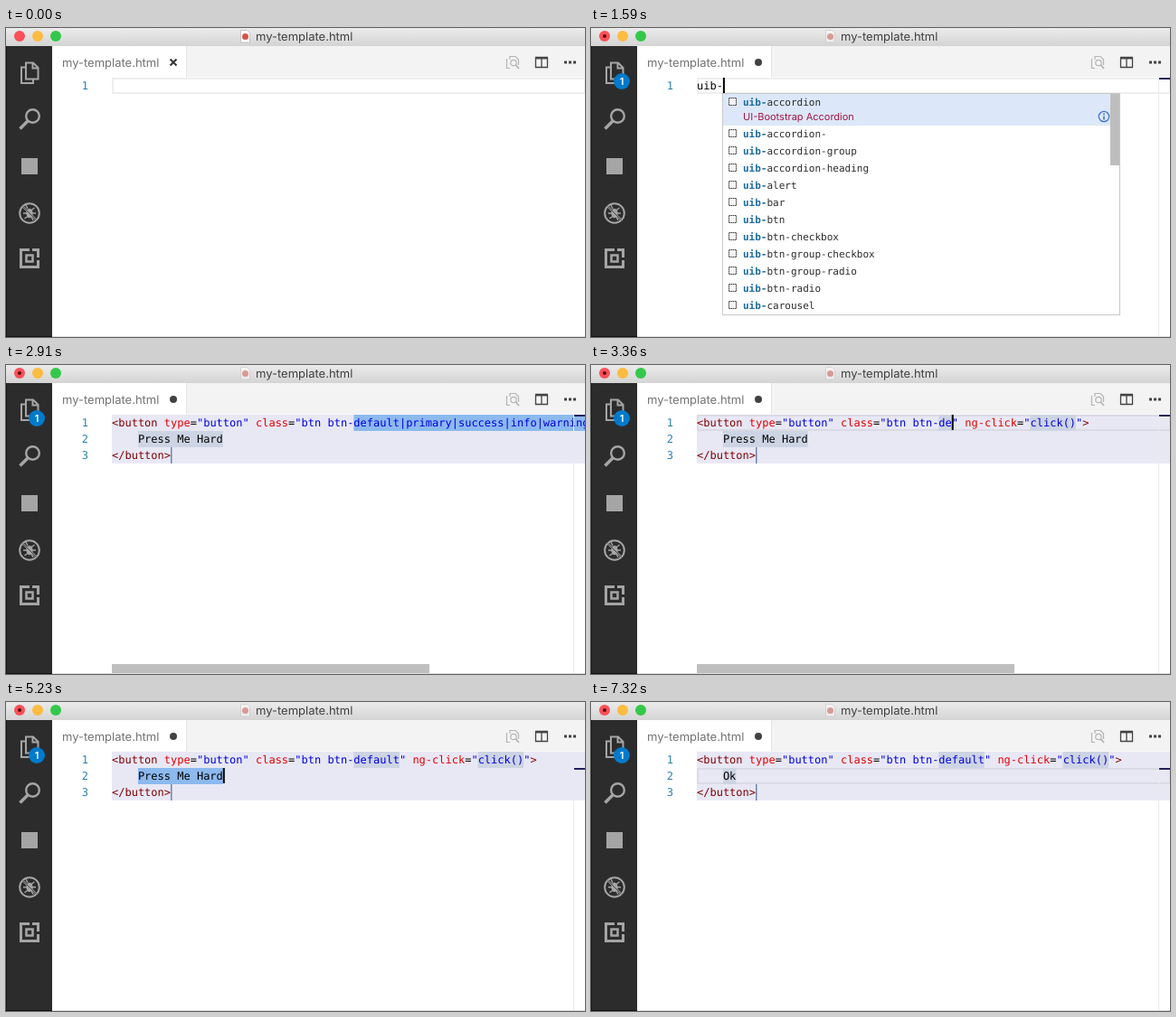
An HTML page that plays this animation: 640x342 px, repeating every 7.37 s.

```html
<!DOCTYPE html>
<html lang="en">
<head>
<meta charset="utf-8">
<title>Snippet completion</title>
<style>
  html, body { margin: 0; width: 100%; height: 100%; overflow: hidden; background: #fff; }
  svg { display: block; width: 640px; height: 342px; text-rendering: geometricPrecision; }
  text { white-space: pre; }
  .ui { font-family: Inter, "Open Sans", sans-serif; }
  .code { font: 12px "DejaVu Sans Mono", monospace; }
  .item { font: 11px "DejaVu Sans Mono", monospace; fill: #2b2b2b; }
  .hit { font-weight: bold; fill: #1d6c9f; }
  .num { fill: #2b7fa8; text-anchor: end; }
  .tag { fill: #800000; }
  .attr { fill: #e50000; }
  .str { fill: #0000e0; }
  .icon { fill: none; stroke: #a5a5a5; stroke-width: 2; }
</style>
</head>
<body>
<svg viewBox="0 0 640 342">
  <defs>
    <linearGradient id="bar" x2="0" y2="1">
      <stop offset="0" stop-color="#ebebeb"/><stop offset="1" stop-color="#d4d4d4"/>
    </linearGradient>
  </defs>
  <rect width="640" height="342" fill="#fff"/>

  <g id="editor"></g>

  <!-- title bar -->
  <rect width="640" height="20" fill="url(#bar)"/>
  <circle cx="15" cy="9" r="6" fill="#fb5057"/>
  <circle cx="35" cy="9" r="6" fill="#fcbc40"/>
  <circle cx="55" cy="9" r="6" fill="#34c84a"/>
  <circle class="dirty" cx="15" cy="9" r="2" fill="#5c0a0c"/>
  <g id="file">
    <path d="M259.500 2.500h7l3 3v10.500h-10z" fill="#fff" stroke="#c4c4c4"/>
    <circle cx="264.500" cy="9.500" r="3.500" fill="#d2564a"/>
  </g>
  <text class="ui" x="276" y="13.500" font-size="13" fill="#404040">my-template.html</text>

  <!-- tab strip -->
  <rect x="51" y="20" width="589" height="34.500" fill="#f3f3f3"/>
  <rect x="51" y="20" width="148" height="35" fill="#fff"/>
  <path d="M199.500 20V54.500" stroke="#e4e4e4"/>
  <text class="ui" x="62" y="42.500" font-size="13" fill="#737373">my-template.html</text>
  <path class="clean" d="M181.500 34.500l7 7m0-7l-7 7" stroke="#333" stroke-width="2"/>
  <circle class="dirty" cx="185" cy="38" r="4" fill="#424242"/>
  <g fill="none" stroke="#b4b4b4" stroke-width="1.200">
    <path d="M557 44.500h-3.500V34M557 35V31.500h6l3.500 3.500v6"/>
    <circle cx="561" cy="38.500" r="3.200"/>
    <path d="M563.500 41l3.500 4" stroke-width="1.800"/>
  </g>
  <path d="M585.500 33.500h13v10h-13zM592 33v11" fill="none" stroke="#444" stroke-width="1.300"/>
  <path d="M585 33h14" stroke="#444" stroke-width="2.500"/>
  <path d="M617 38h3m2 0h3m2 0h3" stroke="#444" stroke-width="2.800"/>

  <!-- activity bar -->
  <rect y="20" width="51" height="322" fill="#2c2c2c"/>
  <path d="M.5 20V342" stroke="#191717"/>
  <path d="M0 341.500H51" stroke="#111"/>
  <path d="M51 341.500H640" stroke="#dcdcdc"/>
  <g class="icon">
    <path d="M22 38.500h8l5.500 5.500v12.500H22zM29.500 38.500v6h6"/>
    <path d="M22 43.500H17V61H30V56.500"/>
    <circle cx="29.500" cy="97.500" r="7.300" stroke-width="2.400"/>
    <path d="M24 103L15.500 111.500" stroke-width="3.500"/>
    <circle cx="26" cy="205" r="10.800"/>
    <path d="M18.500 197.500l15 15"/>
    <path d="M19 205h14M20.500 211l4-3M31.500 199l-4 3M28 209l2 4M22 196l2 4" stroke-width="1.400"/>
    <path d="M26 245.500H16.500V264.500H35.500V257M29 245.500h6.500v8.500" stroke-width="3"/>
    <path d="M22.500 251.500h7v7h-7z" stroke-width="2.500"/>
  </g>
  <ellipse cx="26" cy="205" rx="3.600" ry="5.200" fill="#a5a5a5"/>
  <path d="M18.500 197.500l15 15" stroke="#2c2c2c" stroke-width=".8"/>
  <rect x="17" y="144" width="18" height="18" fill="#a5a5a5"/>
  <g id="badge">
    <circle cx="34" cy="59" r="9" fill="#007acc"/>
    <text class="ui" x="34" y="63" font-size="11" font-weight="600" fill="#fff" text-anchor="middle">1</text>
  </g>

  <g id="popup"></g>
</svg>

<script>
const LOOP = 7370, X = 117, TOP = 55, LINE = 18, CW = 7.224;
const $ = id => document.getElementById(id);

const uib = ['accordion', 'accordion-', 'accordion-group', 'accordion-heading', 'alert', 'bar', 'btn',
  'btn-checkbox', 'btn-group-checkbox', 'btn-group-radio', 'btn-radio', 'carousel'].map(n => 'uib-' + n);
const tags = ['object', 'ol', 'optgroup', 'option', 'output'];
const about = {
  'uib-accordion': 'UI-Bootstrap Accordion',
  'uib-bar': 'UI-Bootstrap Bar',
  'uib-btn': 'UI-Bootstrap Button',
  object: 'HTML - Defines an embedded object'
};

// Plain typing, then the snippet with its three fields: style, click, body.
const steps = [{ at: 0, typed: '' }];
const addTyping = (at, typed) => steps.push({ at, typed });
const addSnippet = (at, style, body, field, selected) => steps.push({ at, style, body, field, selected });
const hint = 'Press Me Hard';

[410, 850, 1250, 1450, 1600, 1800]
  .forEach((at, i) => addTyping(at, 'uib-bt'.slice(0, i + 1)));
addSnippet(2700, 'default|primary|success|info|warning|danger|link', hint, 0, true);
[3150, 3280, 3420, 3520, 3620, 3720, 3820]
  .forEach((at, i) => addSnippet(at, 'default'.slice(0, i + 1), hint, 0));
addSnippet(4100, 'default', hint, 1, true);
addSnippet(5100, 'default', hint, 2, true);
addSnippet(6150, 'default', 'O', 2);
addSnippet(6500, 'default', 'Ok', 2);

const esc = s => s.replace(/&/g, '&amp;').replace(/</g, '&lt;');
const rect = (x, y, w, h, color, extra = '') =>
  `<rect x="${x}" y="${y}" width="${w}" height="${h}" fill="${color}" ${extra}/>`;
const span = (s, cls = '') => `<tspan class="${cls}">${esc(s)}</tspan>`;
const colX = n => X + n * CW;
const lineY = line => TOP + line * LINE;
const row = (line, html) =>
  `<text class="code num" x="91" y="${lineY(line) + 13}">${line + 1}</text>` +
  `<text class="code" x="${X}" y="${lineY(line) + 13}">${html}</text>`;
const attr = (name, value) => span(' ' + name, 'attr') + '=' + span(`"${value}"`, 'str');
const lineBox = (line, color) =>
  rect(X + 1, lineY(line) + 1, 522, LINE - 2, 'none', `stroke="${color}" stroke-width="2"`);
const ruler = line => rect(627, TOP, 1, 287, '#e9e9ee') + rect(628, lineY(line), 12, 2, '#20205c');

function popup(names, word, column, line) {
  const x = Math.floor(colX(column)), y = lineY(line + 1);
  const h = 35 + (names.length - 1) * 19;
  let out = rect(x + .5, y - .5, 439, h + 1, '#fff', 'stroke="#c8c8c8"') + rect(x + 1, y, 438, 35, '#dce8f9');
  names.forEach((name, i) => {
    const base = y + 13 + (i ? 16 + i * 19 : 0);
    out += rect(x + 7.5, base - 8.5, 8, 8, '#f4f4f4', 'stroke="#444" stroke-dasharray="1.500 .5"') +
      `<text class="item" x="${x + 23}" y="${base}">` +
      span(name.slice(0, word.length), 'hit') + span(name.slice(word.length)) + '</text>';
  });
  out += `<text class="ui" x="${x + 23}" y="${y + 29}" font-size="11" fill="#a31545">${about[names[0]]}</text>`;
  if (names.length > 11) out += rect(x + 429, y, 10, 79, '#bebebe');
  return out + `<circle cx="${x + 422}" cy="${y + 25}" r="5.700" fill="none" stroke="#3d6fd0" stroke-width="1.200"/>` +
    `<path d="M${x + 422} ${y + 21.5}v1.700m0 1.300v4" stroke="#3d6fd0" stroke-width="1.600"/>`;
}

function drawTyping({ typed }) {
  $('editor').innerHTML = lineBox(0, '#eee') + (typed ? ruler(0) : '') + row(0, span(typed));
  $('popup').innerHTML = typed.length > 1
    ? popup(uib.filter(n => n.startsWith(typed)), typed, typed.length, 0) : '';
  return [typed.length, 0];
}

function drawSnippet({ style, body, field, selected }) {
  const fields = [[37, style.length, 0], [style.length + 49, 7, 0], [4, body.length, 1]];
  const [start, length, line] = fields[field];
  let out = rect(X, TOP, 523, LINE * 3, '#e8e8f5');
  if (!selected) out += lineBox(line, '#dadae5');
  fields.forEach(([c, n, l], i) => {
    const color = selected && i === field ? '#8cb9ee' : '#cdd4e3';
    out += rect(colX(c), lineY(l), n * CW, LINE, color);
  });
  out += row(0, span('<button', 'tag') + attr('type', 'button') + attr('class', 'btn btn-' + style) +
    attr('ng-click', 'click()') + span('>', 'tag'));
  out += row(1, span('    ' + body)) + row(2, span('</button>', 'tag'));
  out += rect(colX(9), lineY(2), 1.5, LINE, '#6f86a8') + ruler(line);
  $('editor').innerHTML = out;
  $('popup').innerHTML = body === 'O' ? popup(tags, 'o', 5, 1) : '';
  return [start + length, line];
}

let shown;

function show(step) {
  const [column, line] = step.typed === undefined ? drawSnippet(step) : drawTyping(step);
  $('editor').insertAdjacentHTML('beforeend',
    rect(colX(column), lineY(line), 2, LINE - 1, '#000', 'id="caret"') +
    rect(X, 331, 351, 10, '#bfbfbf', 'id="slider"'));
  const dirty = step.at > 0;
  document.querySelectorAll('.dirty').forEach(e => e.style.opacity = +dirty);
  document.querySelector('.clean').style.opacity = +!dirty;
  $('file').style.opacity = dirty ? .5 : 1;
  shown = step;
}

function render(t) {
  const step = steps.findLast(s => s.at <= t);
  if (step !== shown) show(step);
  const since = t - step.at + (step.at ? 0 : 900);
  $('caret').style.opacity = since % 1000 < 500 ? 1 : 0;
  $('slider').style.opacity = t < 2700 ? 0 : Math.max(0, Math.min(1, (4150 - t) / 600));
  $('badge').style.opacity = t < 500 ? 0 : 1;
}

const begin = performance.now();
function tick() {
  render((performance.now() - begin) % LOOP);
  requestAnimationFrame(tick);
}
tick();
</script>
</body>
</html>
```
